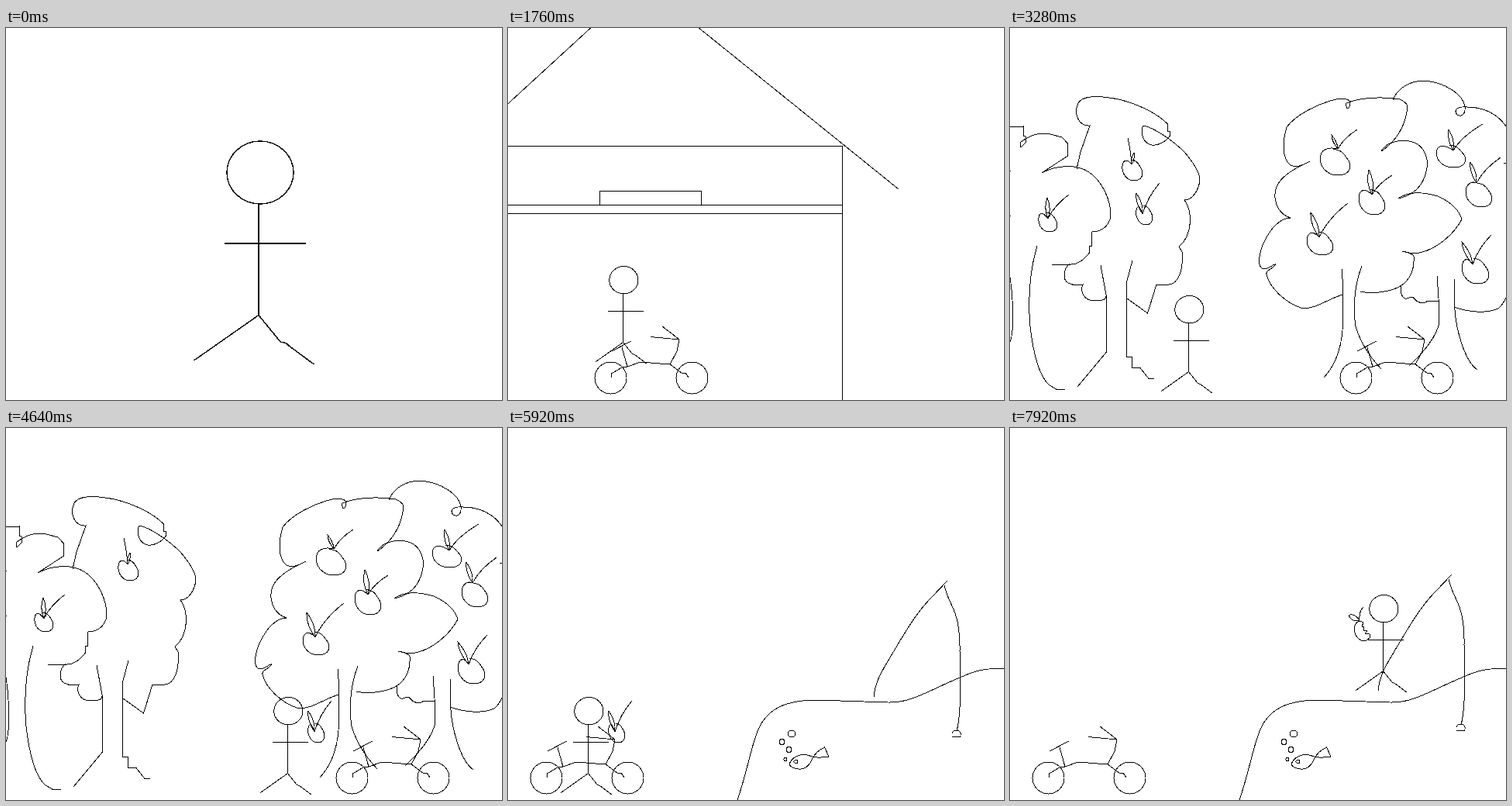
Animation of 640 by 480 pixels, one loop 8000 ms. Source, as an HTML page:

```html
<!DOCTYPE html>
<html lang="en">
<head>
<meta charset="utf-8">
<title>Stick figure outing</title>
<style>
  html, body { margin: 0; width: 100%; height: 100%; overflow: hidden; background: #fff; }
  svg { display: block; width: 640px; height: 480px; }
  path, circle, ellipse { fill: none; stroke: #000; stroke-width: 1; vector-effect: non-scaling-stroke; shape-rendering: crispEdges; }
  #man.close * { stroke-width: 1.5; }
</style>
</head>
<body>
<svg viewBox="0 0 640 480">
  <g id="world">
    <g id="house">
      <path d="M-200 281L172-60 504 208M-90 152.500H431.500V490M-90 228.500H431.500M-90 239.500H431.500M118.500 228V210.500H249.500V228"/>
    </g>

    <g id="trees">
      <!-- far left tree -->
      <path d="M-40 243L1 242M-35 184H1M-20 310C-70 305-75 255-40 243C-75 235-65 190-35 184C-50 160-30 130 0 128L17.500 127V139L20 140V148L14 154 13 148C25 138 40 134 52 137L67 141 74.500 149V165L41 187C60 177 85 175 102 186C118 197 130 220 130 242C128 258 115 263 105.500 263V281H102.500V290C95 300 85 306 75 305H54"/>
      <path d="M35 281C25 315 23 350 26 385C30 420 38 450 51 461L58 465 60 466.500H71M-4 300C5 340 6 390 0 405C-4 430-15 450-30 460"/>
      <!-- second tree -->
      <path d="M86 182L91 160 103 126C88 127 82 110 88 97C95 85 120 88 140 92C165 98 190 110 203.500 124V133H206.500V139C200 148 190 152 183 151C172 148 170 140 170 130L172 126C185 128 210 145 225 160C238 175 244 185 245 195C244 210 235 222 225 222C235 235 235 260 224 276L218 282 222 289C224 310 218 330 205 331L189 331 177.500 368 151 349"/>
      <path d="M77 304C68 312 68 325 75 329C83 333 90 332 94 331C90 340 95 352 110 352C118 352 124 350 124 346M117 306L124.500 347V418L87 463M158 300L150.500 328V424H157.500V438.500H168L179 452.500H186"/>
      <!-- third tree -->
      <path d="M387 172C372 180 368 180 362 177C350 168 352 145 357 128C370 110 400 98 413 94C425 90 437 90 439 96C438 106 433 106 434 97C450 90 480 88 503 92C510 95 513 98 513 103C510 125 500 145 479 159C485 148 500 144 515 146C532 148 540 165 538 180C535 200 525 215 501 220C515 210 535 212 552 217C568 224 580 235 583 247C570 270 545 290 520 291L506 288C512 290 520 290 521 295C522 310 518 320 511 327C500 340 470 344 452 340"/>
      <path d="M387 172C370 180 350 190 344 205C338 220 345 240 362 245C345 245 325 270 321 300C322 312 328 312 332 310C338 308 340 304 343 305C338 312 330 312 331 318C335 335 355 355 378 362C395 362 410 350 429 344"/>
      <path d="M428.500 311C430 340 430 360 429 390C427 415 420 435 405 451M454 307C445 330 442 360 446 385C452 405 465 425 479 440"/>
      <!-- far right tree -->
      <g transform="translate(422)">
        <path d="M72 93C78 78 93 68 113 68C138 70 163 85 165 102C166 112 160 115 155 112C150 106 155 101 168 102C193 102 218 115 226 145C230 160 229 172 215 175C235 170 255 185 256 210C256 230 245 242 229 240C245 235 260 255 262 280C260 300 245 315 222 313C225 325 222 350 208 362C190 370 165 365 151 360"/>
        <path d="M82 333C82 345 85 352 93 348L98 347C103 355 112 357 117 352H132M129 320C131 345 132 365 132 380C128 400 110 420 93 436M151.500 324V358C153 390 165 430 181 441"/>
      </g>
      <g id="fruit"></g>
    </g>

    <g id="pond">
      <path d="M296 480C308 445 312 420 319 400C328 368 350 351 398 351L490 354C520 355 540 340 583 322C605 312 620 309 645 311"/>
      <g id="fish">
        <circle cx="366" cy="394.500" r="4.500"/><circle cx="353.500" cy="405" r="3.500"/>
        <circle cx="362.500" cy="415" r="3.500"/><circle cx="358" cy="427.500" r="2"/>
        <path d="M363 434C366 424 378 420 386 422C394 424 396 426 404 425L414 424 408.500 412C400 416 396 420 392 428C388 438 380 441 375 440C368 440 364 436 363 434Z"/>
        <ellipse cx="371.500" cy="430.500" rx="2.500" ry="2"/>
      </g>
      <g id="rod">
        <path d="M472 347C474 325 485 310 493 296C510 268 525 240 547 218L567 197M563 203C568 225 576 230 580 250C584 270 583 280 583 290V360Q582 380 579 391"/>
        <path d="M573 398Q572 390 579 390Q585 390 584 398Z"/>
      </g>
    </g>

    <g id="bike">
      <circle cx="49.500" cy="451.500" r="20.500"/><circle cx="154.500" cy="451.500" r="20.500"/>
      <path d="M51 417L76 404M64 412L71 437M50.500 451V446L64 438 71 437 88 431 126 434 141 445 146 445 150 451M126 434L135 417 138 402 101 398.500M138 402L124 391 116 385"/>
    </g>
    <g id="apple"></g>
    <path id="bitten" d="M452 249C444 250 443 260 446 267C450 274 456 276 460 274L465 270 464 266 458 265 461 262 456 261 457 257 454 256 456 251 452 249M451 248C445 240 440 240 437 242C440 248 445 250 451 248Q450 237 456 231"/>
  </g>

  <g id="man">
    <ellipse cx="328" cy="186.500" rx="43" ry="40.500"/>
    <path d="M326 227V370.500L242.500 429M282 278H387M326 370.500L354.500 405.500Q361 405 365 410L397.500 434"/>
  </g>
</svg>
<script>
const STEP = 80, LOOP = 8000;
const TREES = 920, POND = 1694; // world positions of the later scenes
const PICK = 3760, GRAB_ROD = 6640, BITE = 7200;
const el = id => document.getElementById(id);

// An apple: joint of stem and leaf, body box, leaf tip, stem tip
function apple([jx, jy, x, y, w, h, lx, ly, sx, sy]) {
  const at = (u, v) => `${x + u * w} ${y + v * h}`;
  const body = `M${jx} ${jy}Q${at(.2, -.08)} ${at(.06, .2)}C${at(-.06, .65)} ${at(.25, 1)} ${at(.6, 1)}` +
    `C${at(1, 1)} ${at(1.1, .65)} ${at(.88, .35)}Q${at(.7, .02)} ${at(.45, .05)}`;
  const mx = (jx + lx) / 2, my = (jy + ly) / 2, bulge = (jy - ly) * .2;
  const leaf = `M${jx} ${jy}Q${mx - bulge} ${my} ${lx} ${ly}Q${mx + bulge} ${my} ${jx} ${jy}`;
  const stem = `M${jx} ${jy}Q${jx + (sx - jx) * .3} ${jy + (sy - jy) * .55} ${sx} ${sy}`;
  return `<path d="${body}${leaf}${stem}"/>`;
}

el('fruit').innerHTML = [
  [157, 176, 144, 169, 27, 28, 160, 161, 152, 142],
  [49, 246, 36, 237, 25, 26, 48, 219, 76, 215],
  [423, 156, 399, 155, 40, 35, 415, 138, 448, 131],
  [467, 215, 449, 207, 35, 34, 463, 183, 493, 190],
  [399, 270, 382, 262, 35, 31, 388, 238, 436, 226],
  [572, 158, 549, 150, 39, 30, 566, 131, 610, 124],
  [602, 200, 587, 199, 35, 32, 594, 173, 633, 167],
  [597, 305, 582, 296, 36, 34, 583, 276, 621, 267]
].map(apple).join('');
el('apple').innerHTML = apple([171, 240, 162, 228, 22, 26, 163, 213, 193, 200]);

// Linear tracks of [time, value] points
const tracks = {
  camera: [[1680, -23], [1760, 0], [2000, 150], [2880, TREES], [4880, TREES], [5360, TREES + 422], [5760, POND]],
  bike: [[1760, 112], [2960, 426], [4880, 426], [5360, 183], [5760, 29]],
  manX: [[400, 400], [1040, 250], [1120, 250], [1520, 148], [1760, 148], [2880, 440], [2960, 418], [3440, 136],
    [4080, 136], [4320, 277], [4400, 277], [4640, 363], [4880, 461], [5360, 217], [5760, 64], [5920, 103], [6560, 481]],
  manY: [[1520, 363], [1680, 325], [2880, 325], [2960, 363], [3440, 363], [3760, 213], [4080, 365], [4800, 365],
    [4880, 323], [5760, 323], [5920, 365], [6160, 365], [6560, 233]],
  rodTurn: [[6640, 0], [7040, -25], [7360, 20], [7680, 0]],
  rodX: [[6560, 0], [6640, 3]],
  rodY: [[6560, 0], [6800, -28], [7680, -8]],
  fish: [[7120, 0], [7520, 18], [7920, 0]]
};

function value(name, t) {
  const points = tracks[name];
  const next = points.findIndex(p => p[0] > t);
  if (next === 0) return points[0][1];
  if (next < 0) return points[points.length - 1][1];
  const [t0, a] = points[next - 1], [t1, b] = points[next];
  return a + (b - a) * (t - t0) / (t1 - t0);
}

const transform = (id, text) => el(id).setAttribute('transform', text);
const place = (id, x, y = 0) => transform(id, `translate(${Math.round(x)} ${Math.round(y)})`);
const show = (id, on) => el(id).setAttribute('display', on ? 'inline' : 'none');

function draw(t) {
  const closeUp = t < 400;
  show('world', !closeUp);
  el('man').setAttribute('class', closeUp ? 'close' : '');
  if (closeUp) return transform('man', 'translate(0 0)');

  const camera = value('camera', t), x = value('manX', t), y = value('manY', t);
  place('house', -camera);
  place('trees', TREES - camera);
  place('pond', POND - camera);
  place('bike', value('bike', t) - 29);
  place('fish', 0, value('fish', t));
  transform('rod', `translate(${value('rodX', t)} ${value('rodY', t)}) rotate(${value('rodTurn', t)} 472 347)`);
  transform('man', `translate(${Math.round(x) + .5} ${Math.round(y)}) scale(.432 .437) translate(-326 -186)`);

  show('apple', t < BITE);
  show('bitten', t >= BITE);
  if (t < PICK) place('apple', TREES - camera);
  else place('apple', x - 136 - (t >= GRAB_ROD ? 64 : 0), y - 213);
  place('bitten', x - 481, y - 233);
}

function frame() {
  draw(Math.floor(performance.now() % LOOP / STEP) * STEP);
  requestAnimationFrame(frame);
}
frame();
</script>
</body>
</html>
```
